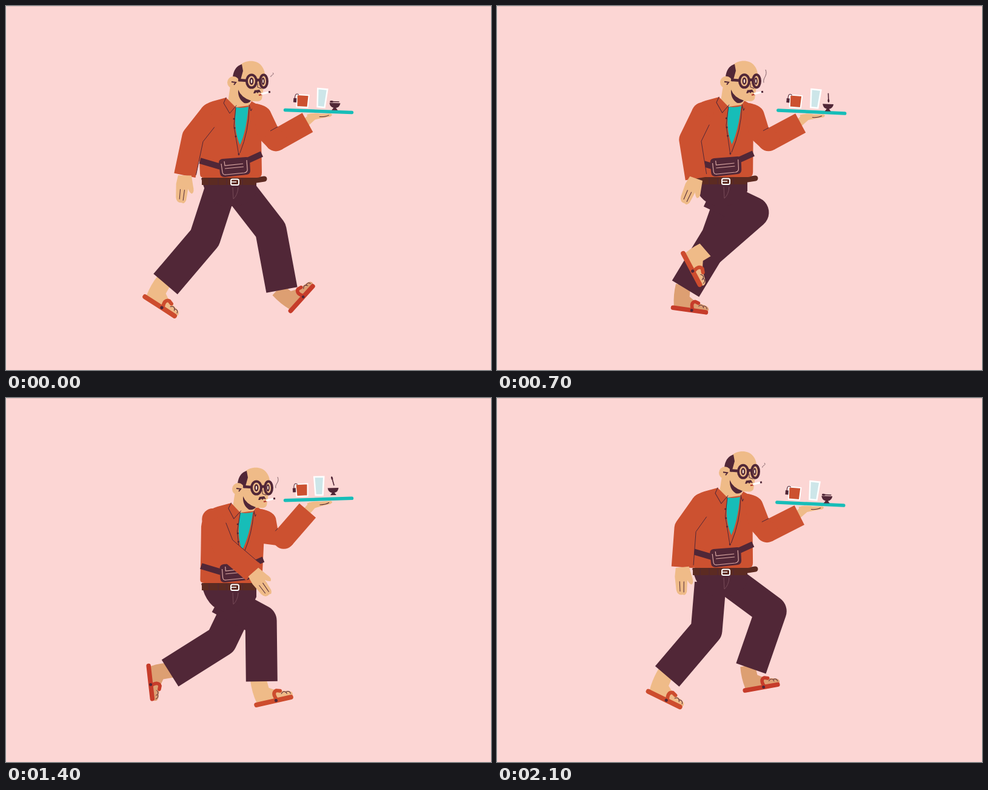
These frames come from a looping animation (800x600 px, 2170 ms). An HTML page:

```html
<!DOCTYPE html>
<html lang="en">
<head>
<meta charset="utf-8">
<title>Waiter walk</title>
<style>
  html, body { margin: 0; width: 100%; height: 100%; overflow: hidden; background: #fcd6d4; }
  svg { display: block; width: 100vw; height: 100vh; --skin: #efbb88; --sole: #cd4c2e; }
  #farFoot { --skin: #dd9f72; --sole: #c63c2a; }
  .shirt { fill: #cc5130; }
  .skin { fill: var(--skin); }
  .dark { fill: #512737; }
  .line { fill: none; stroke: #512737; stroke-width: 1; stroke-linecap: round; stroke-linejoin: round; }
  .leg { fill: none; stroke: #512737; stroke-width: 52; stroke-linejoin: round; }
  .sleeve { fill: none; stroke: #cc5130; stroke-width: 36; stroke-linejoin: round; }
  .strap { fill: none; stroke: #512737; stroke-width: 10; }
  .trim { fill: none; stroke: #dba9a4; stroke-width: 1.2; }
  .sole { fill: none; stroke: var(--sole); stroke-width: 8; stroke-linecap: round; stroke-linejoin: round; }
  .thin { stroke-width: 6; }
</style>
</head>
<body>
<svg viewBox="0 0 800 600">
  <defs>
    <g id="foot">
      <path class="skin" d="M-18 -6 H8 L9 13 Q22 22 36 24 Q47 26 45 33 H-16 Q-20 14 -18 -6Z"/>
      <path class="line" d="M27 27 Q33 21 36 29 M35 26 Q41 24 42 30"/>
      <path class="sole" d="M-17 36 L41 36"/>
      <path class="sole thin" d="M17 34 Q12 22 20 20 L26 22"/>
      <circle class="dark" cx="16" cy="36" r="2.6"/>
    </g>
  </defs>
  <rect width="800" height="600" fill="#fcd6d4"/>
  <path d="M0 .5 H800" stroke="#dfbfbd"/>
  <path d="M.5 0 V600" stroke="#f3dcda"/>

  <g id="farFoot"><use href="#foot"/></g>
  <path class="leg" id="farLeg"/>
  <g id="nearFoot"><use href="#foot"/></g>
  <path class="leg" id="nearLeg"/>

  <g id="hips">
    <path class="dark" d="M322 284 H413 V306 Q404 327 380 330 H360 Q331 324 322 284Z"/>
    <path d="M323 289 H412" stroke="#5c2b22" stroke-width="12"/>
    <path d="M400 289 L426 285" stroke="#5c2b22" stroke-width="9" stroke-linecap="round"/>
    <path class="line" d="M335 284 V295 M350 284 V295 M364 284 V295 M390 284 V295"/>
    <rect x="371" y="285.500" width="13" height="9.500" rx="2.500" fill="none" stroke="#fff" stroke-width="2"/>
    <path d="M372 290 H380" stroke="#fff" stroke-width="1.500"/>
    <path d="M374 299 L375 318 Q382 312 383 299" fill="none" stroke="#774b58"/>
  </g>

  <g id="neck"><path class="skin" d="M370 132 L366 158 L380 170 L402 168 L404 150Z"/></g>
  <g id="torso">
    <path class="shirt" d="M363 151 L379 167 L401 164 L405 157 L412 161 Q432 165 432 176 L421 214 L422 275 Q422 283 414 283 H327 Q320 283 320 277 L318 230 L316 190 Q317 164 341 157Z"/>
    <path fill="#17bdb8" d="M379 167 Q390 169 400 166 Q396 208 386 229 Q375 205 379 167Z"/>
    <path class="line" d="M363 151 L359 160 L369 177 L380 164 M401 163 L404 173 L410 162 M379 167 L376 198 L384 246 M401 167 Q401 205 386 242"/>
    <g class="dark">
      <circle cx="376" cy="186" r="1.500"/><circle cx="377" cy="201" r="1.500"/>
      <circle cx="379" cy="215" r="1.500"/><circle cx="384" cy="244" r="1.500"/>
    </g>
    <path class="strap" d="M320 255 L354 265 M400 254 L422 244"/>
    <path class="dark" d="M357 252 L396 249 Q401 249 402 254 L403 271 Q403 277 397 278 L361 282 Q354 282 353 276 L351 258 Q351 253 357 252Z"/>
    <path class="trim" d="M360 256 L361 263 L391 260 M361 268 L392 265 M355 260 L357 274 Q358 279 363 278 L393 275 Q399 274 398 268 L397 254"/>
  </g>

  <g id="head">
    <path class="skin" d="M386 98 C394 89 413 88 421 98 C428 106 428 117 427 126 L424 140 L422 153 Q420 158 412 157 L402 157 L401 162 Q384 166 370 146 L372 120Z"/>
    <path class="dark" d="M389 96 Q376 100 374 117 L380 118 L386 125 L391 107Z"/>
    <circle class="skin" cx="375" cy="126" r="10"/>
    <path d="M372 125 L379 126 L376 130" fill="none" stroke="#512737" stroke-width="2"/>
    <path class="dark" d="M383 138 Q388 151 404 156 Q401 161 393 160 Q382 153 383 138Z"/>
    <path d="M383 122 L397 123 M412 122 L419 122" stroke="#512737" stroke-width="4.500"/>
    <g fill="#efbb88" stroke="#512737" stroke-width="4">
      <ellipse cx="405" cy="124" rx="8" ry="10.500"/>
      <ellipse cx="425" cy="124" rx="6" ry="10.500"/>
    </g>
    <g class="dark">
      <ellipse cx="405" cy="124" rx="3.500" ry="6"/><ellipse cx="424" cy="124" rx="2.800" ry="6"/>
      <path d="M408 144 L410 139 L418 138 L421 143 L417 142 L415 144 L413 142 L411 144Z"/>
    </g>
    <g fill="#f6e2cf"><ellipse cx="405" cy="124" rx="1.200" ry="3.200"/><ellipse cx="424" cy="124" rx="1" ry="3.200"/></g>
    <path class="line" d="M415 128 V134 L421 136"/>
    <path d="M417 147 L422 146" stroke="#b0332a" stroke-width="2"/>
    <path d="M421 145 L434 142" stroke="#fff" stroke-width="3"/>
    <path d="M433 142 L436 141.500" stroke="#512737" stroke-width="3"/>
    <path id="smoke" fill="none" stroke="#806068"/>
  </g>

  <path class="shirt" id="upperArm"/>
  <path id="wrist" stroke="#efbb88" stroke-width="13"/>
  <path class="sleeve" id="foreArm"/>
  <circle class="shirt" id="elbow" r="18"/>
  <path class="line" id="armCrease"/>

  <g id="tray">
    <path class="skin" d="M-19 6 Q-8 2 4 4 L20 3 Q25 5 20 8 L6 11 Q-6 14 -16 17Z"/>
    <path class="line" d="M2 9 Q12 9 17 6"/>
    <path d="M-55 0 H55" stroke="#17bdb8" stroke-width="5.500" stroke-linecap="round"/>
    <g id="mug">
      <path d="M-10 -10 H10 L9 10 H-9Z" fill="#cc5130" stroke="#fff" stroke-width="2"/>
      <path class="line" d="M-7 -10 Q-13 -14 -13 -3"/>
      <rect class="dark" x="-15" y="-4" width="5" height="7"/>
    </g>
    <path id="glass" d="M-8 -15 H8 L6 15 H-6Z" fill="#cde6e9" stroke="#fff" stroke-width="2.500"/>
    <g id="bowl">
      <path class="dark" d="M-9 -5 H9 Q8 2 2 3 L5 7 H-5 L-2 3 Q-8 2 -9 -5Z"/>
      <g id="spoon"><path d="M-7 0 H7" stroke="#512737" stroke-width="1.600"/><ellipse class="dark" cx="-5.500" rx="3" ry="1.500"/></g>
    </g>
  </g>

  <circle class="shirt" id="shoulder" r="18"/>
  <path class="sleeve" id="nearArm"/>
  <path class="line" id="nearCrease"/>
  <g id="hand">
    <path class="skin" d="M-11 0 H11 L14 17 Q17 28 12 30 Q8 28 6 22 L3 41 Q0 48 -4 45 Q-13 46 -14 36 L-14 14Z"/>
    <path class="line" d="M-7 23 L-8 39 M0 24 L-2 41"/>
  </g>
</svg>
<script>
const STEP = 70, COUNT = 31, THIGH = 78, SHIN = 100, RAD = Math.PI / 180;

// Key poses of the trunk: frame, drop, lean, tray height
const BODY = [
  [0, 0, 0, 173.5], [3.5, 20, 7, 167], [6, 7, 5, 162], [10, -1, 3, 174.5],
  [14, 5, 7, 173], [20, 22, 8, 167], [23, 6, 4, 162.5], [30, -3, 1, 174.5]
];
// One stride, shared by both legs: frame, ankle x, y, foot angle
const STRIDE = [
  [0, 455, 468, -48], [5.5, 409, 467, -6], [7.5, 347, 470, 1], [10, 311, 466, 8],
  [14.3, 283, 459, 25], [16, 259, 458, 37], [20.3, 272, 453, 84], [23, 300, 416, 71],
  [25.5, 347, 406, 62], [29.7, 409, 440, 0]
];

const $ = id => document.getElementById(id);
const path = (id, d) => $(id).setAttribute('d', d);
const place = (id, x, y, a = 0, size = 1) =>
  $(id).setAttribute('transform', `translate(${x} ${y}) rotate(${a}) scale(${size})`);
const wave = (f, peak, beats = 1) => Math.cos(2 * Math.PI * beats * (f - peak) / COUNT);
const aim = deg => [Math.sin(deg * RAD), Math.cos(deg * RAD)];

// Smooth looping interpolation without overshoot
function sample(rows, f) {
  const n = rows.length;
  const row = i => rows[(i + n) % n];
  const time = i => row(i)[0] + COUNT * Math.floor(i / n);
  let i = n - 1;
  while (row(i)[0] > f) i--;
  const span = time(i + 1) - time(i), u = (f - time(i)) / span;
  const slope = (k, c) => (row(k + 1)[c] - row(k)[c]) / (time(k + 1) - time(k));
  const blend = (a, b) => a * b > 0 ? 2 * a * b / (a + b) : 0;
  return row(i).slice(1).map((a, k) => {
    const c = k + 1, b = row(i + 1)[c], d = slope(i, c);
    const m0 = blend(slope(i - 1, c), d) * span, m1 = blend(d, slope(i + 1, c)) * span;
    const u2 = u * u, u3 = u2 * u;
    return a * (2 * u3 - 3 * u2 + 1) + m0 * (u3 - 2 * u2 + u) + b * (3 * u2 - 2 * u3) + m1 * (u3 - u2);
  });
}

// The knee follows from hip and ankle and always bends forward
function drawLeg(name, f, hx, hy, size) {
  const [ax, ay, angle] = sample(STRIDE, f % COUNT);
  const dist = Math.hypot(ax - hx, ay - hy);
  const ux = (ax - hx) / dist, uy = (ay - hy) / dist;
  const along = (THIGH ** 2 - SHIN ** 2 + dist ** 2) / (2 * dist);
  const out = Math.sqrt(Math.max(0, THIGH ** 2 - along ** 2));
  const kx = hx + ux * along + uy * out, ky = hy + uy * along - ux * out;
  path(name + 'Leg', `M${hx} ${hy} L${kx} ${ky} L${ax} ${ay}`);
  place(name + 'Foot', ax, ay, angle, size);
}

// The forearm steepens as the trunk sinks below the tray
function drawTrayArm(bob, lean, tx, ty) {
  const uy = -0.49 - 0.0093 * (bob + 173.5 - ty), ux = Math.sqrt(1 - uy * uy);
  const wx = tx - 18, wy = ty + 18.5;
  const ex = wx - ux * 60, ey = wy - uy * 60;
  const ix = ex + uy * 18, iy = ey - ux * 18;
  const reach = Math.max(0, (448 - ix) / ux);
  const kx = ix + ux * reach, ky = iy + uy * reach;
  path('upperArm', `M${404 + lean} ${160 + bob} Q${432 + lean} ${162 + bob} ${437 + lean} ${176 + bob} L${kx} ${ky} L${ex} ${ey} L${ex - 13} ${ey + 12} L416 ${217 + bob}Z`);
  path('foreArm', `M${ex} ${ey} L${wx} ${wy}`);
  path('wrist', `M${wx - ux * 8} ${wy - uy * 8} L${tx - 10} ${ty + 9}`);
  path('armCrease', `M${ix} ${iy} L${kx} ${ky}`);
  place('elbow', ex, ey);
}

function drawNearArm(f, sx, sy) {
  const flex = 7 * wave(f, 5.5, 2);
  const [ax, ay] = aim(-14 - 29 * wave(f, 4) + flex);
  const [bx, by] = aim(16 - 41 * wave(f, 3.3) - flex);
  const ex = sx + ax * 48, ey = sy + ay * 48;
  const wx = ex + bx * 65, wy = ey + by * 65;
  const h = 18 / (1 + ax * bx + ay * by);
  const cx = ex + h * (ay + by), cy = ey - h * (ax + bx);
  place('shoulder', sx, sy);
  path('nearArm', `M${sx} ${sy} L${ex} ${ey} L${wx} ${wy}`);
  path('nearCrease', `M${cx - ax * 30} ${cy - ay * 30} L${cx} ${cy} L${wx + by * 18 - bx * 5} ${wy - bx * 18 - by * 5}`);
  place('hand', wx, wy, 36 * wave(f, 6.5) - 8);
}

// Everything on the tray slides and tips with its tilt
function drawTray(f, tx, ty, tilt) {
  const spin = -360 * Math.min(1, Math.max(0, (f - 5) / 19));
  place('tray', tx, ty, tilt);
  place('mug', -27, -16, tilt * 0.7);
  place('glass', 3 + tilt * 0.8, -22, 2 + tilt * 0.5);
  place('bowl', 25.5 + tilt * 0.5, -11.5 + tilt * 0.9);
  place('spoon', 0, -7 - 9 * Math.abs(Math.sin(spin * RAD)), spin);
}

function draw(f) {
  const [bob, lean, ty] = sample(BODY, f);
  const tx = 515.5 + 3.5 * Math.sin(Math.PI * lean / 8);
  drawLeg('far', f, 389, 308 + bob, 0.94);
  drawLeg('near', f + COUNT / 2, 352, 308 + bob, 1);
  place('hips', 0, bob);
  place('neck', lean, bob);
  $('torso').setAttribute('transform', `matrix(1 0 ${-lean / 125} 1 ${lean * 283 / 125} ${bob})`);
  place('head', lean, bob + lean * 0.25);
  drawTrayArm(bob, lean, tx, ty);
  drawTray(f, tx, ty, (ty - 170) / 1.7);
  drawNearArm(f, 338 + lean * 0.4, 178 + bob);

  const puff = wave(f, 0, 2), len = 16 - 9 * puff;
  path('smoke', `M437 ${123 - 6 * puff} c-2 ${-len * 0.4} 7 ${-len * 0.5} 3 ${-len}`);
}

const start = performance.now();
function tick() {
  draw(Math.floor((performance.now() - start) / STEP) % COUNT);
  requestAnimationFrame(tick);
}
tick();
</script>
</body>
</html>
```
